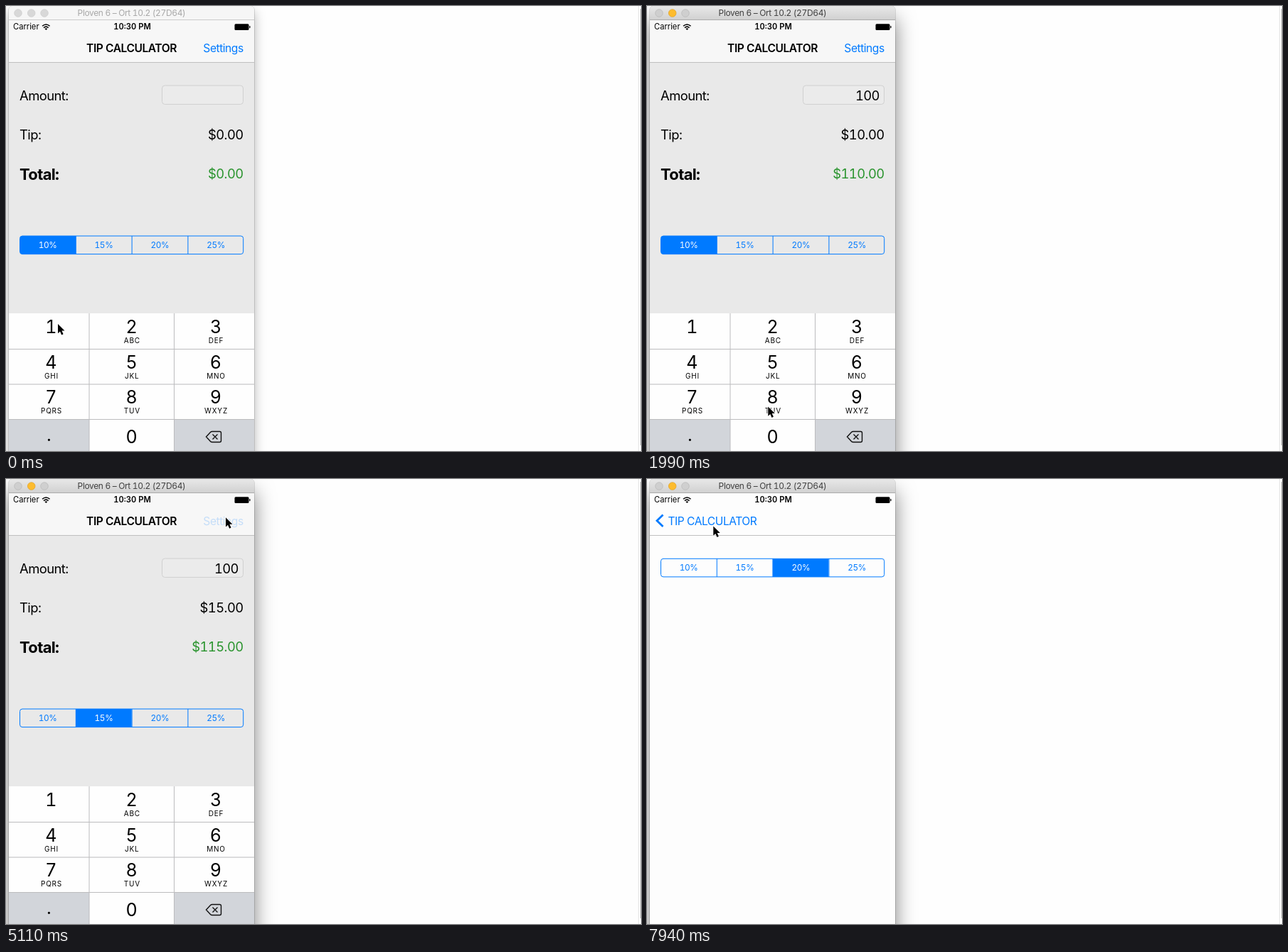
Animation, 893 px wide and 627 px high, one loop 8 s. Source, as an HTML page:

```html
<!DOCTYPE html>
<html lang="en">
<head>
<meta charset="utf-8">
<title>Tip calculator</title>
<style>
html, body { margin: 0; height: 100%; overflow: hidden; background: #fefefe; }
svg { display: block; width: 100vw; height: 100vh; }
text { font-family: Inter, Roboto, sans-serif; font-size: 18.4px; letter-spacing: -.03em; font-variant-numeric: tabular-nums; }
.mid { text-anchor: middle; }
.end { text-anchor: end; }
.nav { font-size: 15.6px; }
.status { font-size: 11.2px; letter-spacing: 0; }
.seg { font-size: 11.8px; }
.digit { font-size: 25px; }
.abc { font-size: 10px; letter-spacing: .08em; }
.blue { fill: #007aff; }
</style>
</head>
<body>
<svg viewBox="0 0 893 627" id="stage"></svg>
<script>
const BLUE = '#007aff', GREY = '#d2d5da';
const rect = (x, y, w, h, fill, more = '') =>
  `<rect x="${x}" y="${y}" width="${w}" height="${h}" fill="${fill}" ${more}/>`;
const text = (x, y, s, cls = '', more = '') =>
  `<text x="${x}" y="${y}" class="${cls}" ${more}>${s}</text>`;

// Segmented control in its own coordinates, placed by its top edge
function segments(id, y) {
  let out = `<g transform="translate(19.5 ${y})"><g clip-path="url(#round)">`;
  for (let i = 0; i < 4; i++) out += rect(i * 78.6, 0, 78.6, 25.6, 'none', `id="${id}Box${i}"`);
  out += '</g>' + rect(0, 0, 314.2, 25.6, 'none', `rx="3.5" stroke="${BLUE}"`);
  for (let i = 0; i < 4; i++) {
    if (i) out += rect(i * 78.8 - .5, 0, 1, 25.6, BLUE);
    out += text(39.2 + i * 78.8, 17.2, 10 + i * 5 + '%', 'seg mid', `id="${id}Label${i}"`);
  }
  return out + '</g>';
}

function keypad() {
  const cols = [[4, 113, 63], [117, 119.5, 176.3], [236.5, 113, 294.5]];
  const letters = ['', 'ABC', 'DEF', 'GHI', 'JKL', 'MNO', 'PQRS', 'TUV', 'WXYZ'];
  let out = rect(4, 433, 345, 194, '#fefefe') + rect(4, 582.5, 345, 45, GREY)
    + rect(117, 582.5, 119.5, 45, '#fefefe', 'id="key0"') + rect(4, 433, 112.5, 50, GREY, 'id="key1"');
  letters.forEach((abc, i) => {
    const x = cols[i % 3][2], y = 461 + Math.floor(i / 3) * 49.5;
    out += text(x, y, i + 1, 'digit mid') + text(x + 1, y + 14, abc, 'abc mid');
  });
  for (const y of [483, 532.5, 582]) out += rect(4, y, 345, 1, '#bcbcbe');
  for (const x of [116.5, 236]) out += rect(x, 433, 1, 194, '#bcbcbe');
  return out + text(176.3, 616, 0, 'digit mid') + text(60, 613, '.', 'digit mid')
    + `<path d="M281.5 607L287.5 600.5Q288.5 599.5 290 599.5H300.5Q302.5 599.5 302.5 601.5V612.5Q302.5 614.5 300.5 614.5H290Q288.5 614.5 287.5 613.5ZM290.5 603.5L297.5 610.5M297.5 603.5L290.5 610.5" fill="none" stroke="#111" stroke-width="1.4"/>`;
}

const calculator = rect(4, 20, 345, 59, '#f7f7f7') + rect(4, 79, 345, 354, '#e9e9e9')
  + text(176.5, 64.5, 'TIP CALCULATOR', 'nav mid', 'font-weight="600"')
  + text(19, 132.5, 'Amount:') + text(19, 187.5, 'Tip:')
  + text(19, 244.5, 'Total:', '', 'style="font-size:22px" font-weight="700"')
  + rect(219.5, 112, 114, 26.5, '#ebebeb', 'rx="4" stroke="#d0d0d0"')
  + text(327, 132.5, '', 'end', 'id="amount"') + rect(326, 115, 1.7, 22, '#3d6be0', 'id="caret"')
  + text(333.7, 187.5, '', 'end', 'id="tip"')
  + text(333.7, 242.7, '', 'end', 'id="total" fill="#2a942e"')
  + segments('main', 324) + keypad();

stage.innerHTML = `
<defs>
  <clipPath id="round"><rect width="314.2" height="25.6" rx="3.5"/></clipPath>
  <clipPath id="screen"><rect x="4" y="20" width="345" height="607"/></clipPath>
  <linearGradient id="bar" x2="0" y2="1"><stop stop-color="#e8e8e8"/><stop offset="1" stop-color="#d0d0d0"/></linearGradient>
  <linearGradient id="edge"><stop stop-opacity="0"/><stop offset="1" stop-opacity=".2"/></linearGradient>
</defs>`
  + rect(889, 0, 1, 627, '#e6e6e6') + rect(892, 4, 1, 615, '#b8b8b8')
  + rect(4, 0, 345, 680, '#fdfdfd', 'id="frame" rx="5" stroke="#000" stroke-opacity=".25"')
  + `<path id="titleBar" d="M4 20V5Q4 0 9 0H344Q349 0 349 5V20Z"/>` + rect(4, 19, 345, 1, '#000', 'opacity=".18"')
  + [17, 35.7, 54].map((x, i) => `<circle id="light${i}" cx="${x}" cy="10" r="5.3"/>`).join('')
  + text(176.5, 14.4, 'Ploven 6 – Ort 10.2 (27D64)', 'mid', 'id="caption" style="font-size:12px"')
  + `<g clip-path="url(#screen)"><g id="calc">${calculator}</g><g id="options">`
  + rect(4, 20, 345, 607, '#000', 'id="dim" opacity=".12" transform="translate(-345 0)"')
  + rect(-5, 20, 9, 607, 'url(#edge)') + rect(4, 20, 345, 607, '#fdfdfd') + segments('opt', 112.3) + '</g>'
  + rect(4, 79, 345, 1, '#c0c0c0')
  + text(333.7, 64.5, 'Settings', 'nav end blue', 'id="settings"')
  + `<g id="back"><path id="chevron" d="M22.5 50.5L14 58.8L22.5 67" fill="none" stroke="${BLUE}" stroke-width="2.8"/>`
  + text(29.5, 64.5, 'TIP CALCULATOR', 'nav blue', 'id="backLabel"') + '</g>'
  + text(10, 33.4, 'Carrier', 'status') + text(177.6, 33.4, '10:30 PM', 'status mid', 'font-weight="600"')
  + `<path d="M51 28.3Q56.3 23.6 61.6 28.3M53 30.6Q56.3 27.6 59.6 30.6" fill="none" stroke="#000" stroke-width="1.5"/><path d="M54.4 32Q56.3 30.4 58.2 32L56.3 34Z"/>`
  + rect(321.5, 25.3, 20, 8.6, '#000', 'rx="1.5"') + rect(342.2, 28, 1.3, 3.2, '#000', 'rx=".6"') + '</g>'
  + '<path id="pointer" d="M0 0V13.2L3 10.4L5.2 15.4L7.6 14.3L5.4 9.5H9.5Z" stroke="#fff" stroke-width="1.6" paint-order="stroke"/>';

const $ = id => document.getElementById(id);
const set = (id, name, value) => $(id).setAttribute(name, value);
const show = (id, on) => set(id, 'visibility', on ? 'visible' : 'hidden');
const within = (t, a, b) => t >= a && t < b;
const money = v => '$' + v.toFixed(2);

function mark(id, selected, pressed) {
  for (let i = 0; i < 4; i++) {
    set(id + 'Box' + i, 'fill', i === selected ? BLUE : i === pressed ? 'rgba(0,122,255,.14)' : 'none');
    set(id + 'Label' + i, 'fill', i === selected ? '#fff' : BLUE);
  }
}

// Pointer trips: start time, number of steps, end point
const trips = [[450, 3, 174, 607], [1840, 8, 150.3, 335], [4070, 7, 309, 54.3],
  [6160, 3, 226, 136], [6600, 1, 227.3, 126.6], [7500, 4, 93.3, 66.5]];

function pointerAt(t) {
  let x = 73, y = 448;
  for (const [start, steps, toX, toY] of trips) {
    if (t < start) break;
    const k = Math.min(1, (Math.floor((t - start) / 146) + 1) / steps);
    const e = k * k * (3 - 2 * k);
    x += (toX - x) * e;
    y += (toY - y) * e;
  }
  return `translate(${x} ${y})`;
}

function draw(now) {
  const t = now % 8000;
  const active = t >= 150;
  $('frame').style.filter = active
    ? 'drop-shadow(0 18px 14px rgba(0,0,0,.5))' : 'drop-shadow(0 8px 8px rgba(0,0,0,.3))';
  set('titleBar', 'fill', active ? 'url(#bar)' : '#f6f6f6');
  set('caption', 'fill', active ? '#404040' : '#a8a8a8');
  for (let i = 0; i < 3; i++) {
    const lit = active && i === 1;
    set('light' + i, 'fill', lit ? '#fdbc2e' : active ? '#cfcfcf' : '#d8d8d8');
    set('light' + i, 'stroke', lit ? '#dfa023' : active ? '#b8b8b8' : '#cccccc');
    set('light' + i, 'stroke-width', .7);
  }

  const amount = t < 300 ? '' : t < 1100 ? '1' : t < 1550 ? '10' : '100';
  const picked = t < 3180 ? 0 : 1;
  const tip = amount * (.1 + picked * .05);
  $('amount').textContent = amount;
  $('tip').textContent = money(tip);
  $('total').textContent = money(+amount + tip);
  show('caret', active && t < 5110 && (t < 1990 || Math.floor((t - 1990) / 520) % 2 === 1));
  show('key1', within(t, 150, 300));
  set('key0', 'fill', within(t, 950, 1100) || within(t, 1250, 1550) ? GREY : '#fefefe');
  mark('main', picked, within(t, 3030, 3180) ? 1 : -1);
  mark('opt', t < 6900 ? 1 : 2, within(t, 6750, 6900) ? 2 : -1);

  const pushed = t >= 5560;
  const rest = pushed ? .1 ** Math.floor((t - 5560) / 150) : 1;
  const gap = t >= 5860 ? 0 : 13 * rest;
  for (const id of ['options', 'back']) set(id, 'display', pushed ? 'inline' : 'none');
  set('calc', 'transform', `translate(${pushed ? -104 + gap * .3 : 0} 0)`);
  set('options', 'transform', `translate(${gap} 0)`);
  set('backLabel', 'x', 29.5 + gap * .17);
  set('chevron', 'opacity', 1 - .55 * gap / 13);
  set('settings', 'opacity', pushed ? .06 * gap / 13 : t >= 5110 ? .2 : 1);
  $('settings').style.fill = pushed ? '#000' : BLUE;
  set('pointer', 'transform', pointerAt(t));
  requestAnimationFrame(draw);
}
draw(0);
</script>
</body>
</html>
```
